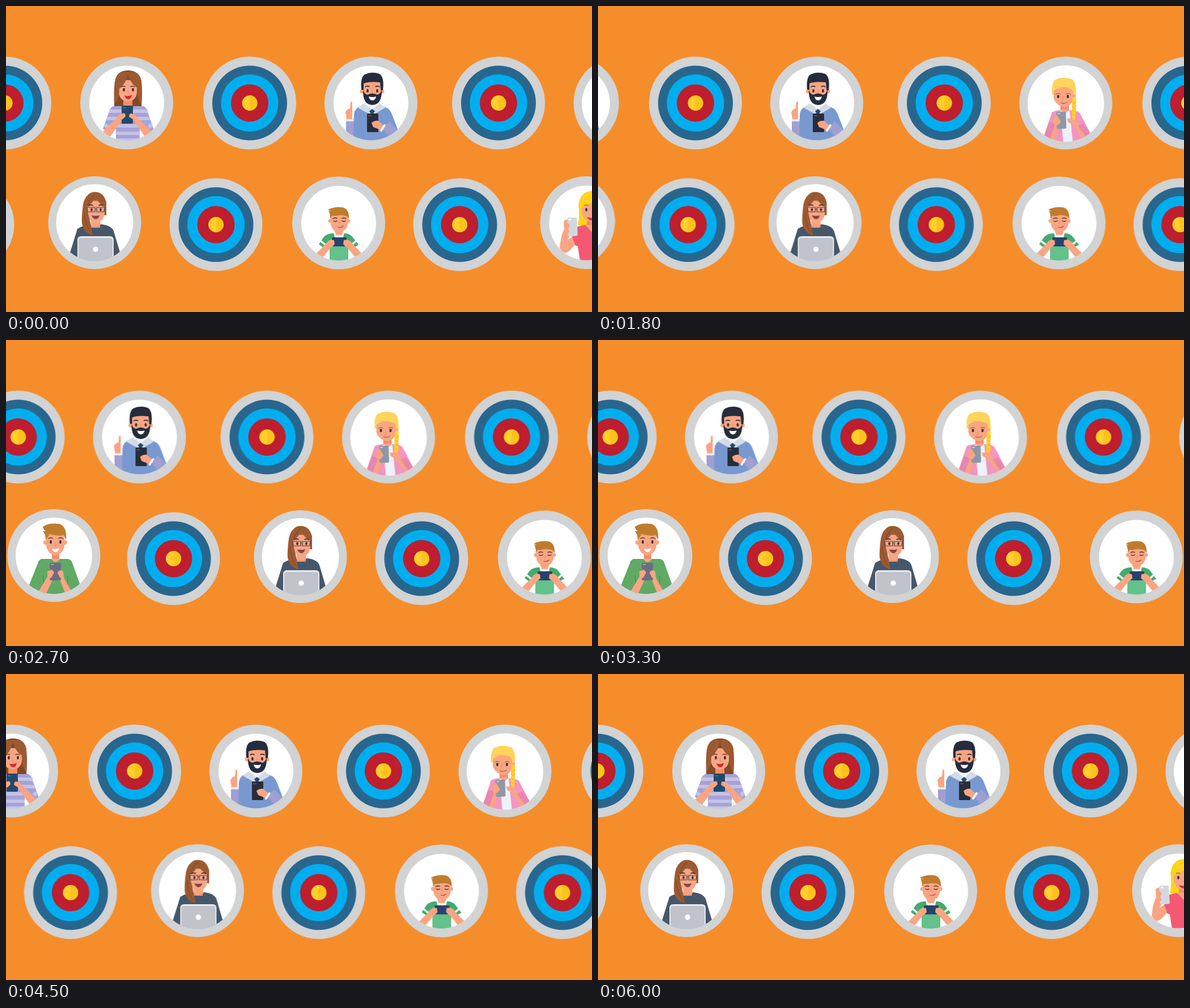
Animation of 1034x541 px, one loop 6300 ms. Source, as an HTML page:

```html
<!DOCTYPE html>
<html lang="en">
<head>
<meta charset="utf-8">
<title>Targets and people</title>
<style>
  html, body { margin: 0; width: 100%; height: 100%; overflow: hidden; background: #f68d2b; }
  svg { display: block; width: 100%; height: 100%; }
</style>
</head>
<body>
<svg id="stage" viewBox="0 0 1034 541"></svg>
<script>
const SKIN = '#f9a583', SHADE = '#ef8f6f', INK = '#2a2c3a', BROWN = '#9c5a32', DARK_BROWN = '#854826';

const path = (fill, d) => `<path fill="${fill}" d="${d}"/>`;
const line = (color, w, d) =>
  `<path fill="none" stroke="${color}" stroke-width="${w}" stroke-linecap="round" stroke-linejoin="round" d="${d}"/>`;
const circle = (fill, x, y, r) => `<circle fill="${fill}" cx="${x}" cy="${y}" r="${r}"/>`;
const oval = (fill, x, y, rx, ry) => `<ellipse fill="${fill}" cx="${x}" cy="${y}" rx="${rx}" ry="${ry}"/>`;
const box = (fill, x, y, w, h, r = 0) =>
  `<rect fill="${fill}" x="${x}" y="${y}" width="${w}" height="${h}" rx="${r}"/>`;
const eyes = (x1, x2, y) => oval(INK, x1, y, 1.8, 3) + oval(INK, x2, y, 1.8, 3);
const brows = (color, x1, x2, y) =>
  line(color, 1.6, `M${x1 - 4} ${y + 1}q3 -2.5 7 -.5M${x2 - 3} ${y + .5}q4 -2 7 .5`);

const target = (x, y) =>
  circle('#d1d3d4', x, y, 82) + circle('#29668d', x, y, 66) + circle('#00aeef', x, y, 50.5) +
  circle('#be1e2d', x, y, 33) + circle('#ffcf2b', x, y, 13.5) +
  path('#fdc31c', `M${x} ${y - 13.5}a13.5 13.5 0 0 1 0 27z`);

let clips = 0;
function badge(x, y, innerY, innerR, art, shift = 0) {
  const id = 'clip' + clips++;
  return `<g transform="translate(${shift})"><clipPath id="${id}">${circle('#fff', x, innerY, innerR)}</clipPath>` +
    circle('#d1d3d4', x, y, 82) + circle('#fff', x, innerY, innerR) +
    `<g clip-path="url(#${id})">${art}</g></g>`;
}

const stripedWoman =
  path(DARK_BROWN, 'M191 179Q190 150 192 134Q195 114 215 114Q236 114 239 134Q241 152 239 179z') +
  box(SHADE, 207, 160, 16, 22) +
  path('#a5a3d6', 'M190 177H242Q247 178 249 185L261 219L248 226L236 205V240H194V206L182 224L171 217L183 184Q185 178 190 177z') +
  [183, 196, 209, 222, 234].map((y, i) =>
    i < 2 ? box('#c4c2e8', 182 - i * 4, y, 68 + i * 8, 6) : box('#c4c2e8', 195, y, 41, 6)).join('') +
  path('#c4c2e8', 'M175 207L182 211L179 217L172 213zM256 207L250 211L253 217L259 213z') +
  path(SKIN, 'M206 177Q214 186 224 177z') +
  path(SKIN, 'M199 135Q214 127 231 135V153Q230 167 215 169Q200 167 199 153z') +
  path(BROWN, 'M215 117Q199 113 193 130L191 173Q200 165 200 146Q211 139 215 120Q221 139 231 144Q231 166 239 174L239 132Q234 113 215 117z') +
  brows(DARK_BROWN, 207, 223, 142) + eyes(208, 224, 148) +
  path('#d7282f', 'M209 158Q215 161 222 157Q221 165 215 165Q211 164 209 158z') +
  line(SHADE, 1.3, 'M215 150l1 5') +
  path(SKIN, 'M171 222L199 194Q204 187 211 189L213 196L205 202L183 232zM257 222L231 196Q225 187 218 189L217 197L225 202L245 231z') +
  box('#24486b', 204, 176, 20, 32, 2) + box('#3d6c91', 206, 179, 6, 2) +
  path(SKIN, 'M200 194Q205 188 210 190L211 195L205 201zM228 195Q222 188 218 191L217 196L225 201z');

const beardedMan =
  box('#a09fd1', 600, 202, 14, 40) + box('#e7eaf3', 600, 199, 14, 5) +
  path(SKIN, 'M601 200L599 188Q601 182 607 181L608 170Q610 167 611 171V200z') +
  path('#7899cf', 'M613 240L614 192Q615 180 626 177L645 190L664 177Q676 180 680 189L692 220L674 240z') +
  path('#d4dbe8', 'M631 172L646 182L660 172L669 180L650 191L646 186L641 191L621 180z') +
  path('#f4f5f8', 'M634 172H658L646 184z') +
  path('#214b68', 'M646 182l5 4l-3 4l4 19h-11l3 -19l-3 -4z') +
  circle(SKIN, 628, 151, 3.5) + circle(SKIN, 664, 151, 3.5) +
  path('#242c3e', 'M627 148Q625 126 633 121Q645 115 659 120Q668 126 665 149z') +
  path(SKIN, 'M631 137Q640 133 660 135L662 156Q656 171 646 171Q634 169 631 154z') +
  path('#242c3e', 'M630 148Q632 156 638 157Q646 152 655 157Q661 156 663 147Q664 175 646 175Q629 174 630 148z') +
  path('#fff', 'M640 160Q646 162 653 160Q652 167 646 167Q641 166 640 160z') +
  brows(INK, 638, 655, 142) + eyes(638, 655, 150) + line(SHADE, 1.3, 'M646 149v5') +
  path('#a09fd1', 'M665 217L676 204L692 220L677 232z') +
  box(INK, 637, 190, 20, 33, 1.5) + box('#4d5261', 639, 193, 6, 2) +
  path(SKIN, 'M645 207Q650 202 657 203L668 213L663 220L653 216L648 214z') +
  line('#f4f5f8', 4, 'M668 211l-6 9');

const braidGirl =
  box(SHADE, 816, 168, 15, 23) +
  path('#f395bf', 'M801 188Q805 185 816 184L831 184Q847 185 850 189L872 231L855 242H800L785 235z') +
  path('#eef1f8', 'M816 184L824 190L832 184L838 242H821z') +
  path(SKIN, 'M816 183L824 190L831 183z') +
  path('#ffd45c', 'M801 156Q800 136 806 131Q820 123 837 130Q845 137 843 160L837 163z') +
  circle(SKIN, 839, 160, 4) +
  path(SKIN, 'M804 150Q819 138 838 148V164Q836 177 824 179Q808 176 804 163z') +
  path('#ffd45c', 'M801 154Q803 138 817 134Q831 139 841 155L842 138L823 128Q804 129 802 141z') +
  line('#f3bd36', 1, 'M808 143Q823 142 837 153') +
  brows('#b77e30', 812, 829, 155) + eyes(812, 829, 160) +
  line('#c96357', 1.5, 'M817 171Q822 174 828 170') + line(SHADE, 1.3, 'M820 162v5') +
  line('#ffd02e', 7, 'M840 164L839 195') + path('#ffd02e', 'M836 194h7l-3 12z') +
  line('#edb62c', 1, [170, 177, 184, 191].map(y => `M837 ${y}l3 3l4 -4`).join('')) +
  path(SKIN, 'M793 239L804 207Q801 197 810 193L815 207L806 238zM869 231L846 207Q836 197 828 200L829 205L838 210L856 236z') +
  path('#e885b0', 'M784 237L797 205L807 208L796 239zM873 231L856 207L847 212L864 236z') +
  `<g transform="rotate(-2 817 202)">${box('#8c98a6', 809, 187, 17, 30, 2)}${box('#c4ccd3', 811, 189, 5, 2)}</g>` +
  path(SKIN, 'M803 204Q804 193 810 193L817 204L812 210L806 212zM827 199L838 199L846 207L839 210z');

const laptopWoman =
  path('#465769', 'M126 394Q135 388 150 386H169Q186 388 190 398L206 452H108z') +
  box(SHADE, 150, 376, 16, 16) + path(SKIN, 'M149 387Q158 395 167 387L166 380H150z') +
  path(BROWN, 'M135 369Q136 333 153 329Q174 327 177 350L177 370H135z') +
  path(SKIN, 'M143 349Q157 339 174 350V366Q172 382 159 383Q146 382 143 367z') +
  path(BROWN, 'M157 332Q140 330 136 351Q133 374 134 385Q138 402 153 405Q150 393 148 379Q144 365 143 355Q153 350 157 337Q163 349 174 355L177 367V347Q172 330 157 332z') +
  line(DARK_BROWN, 1.2, 'M138 365Q140 387 149 400M157 333Q148 340 144 353') +
  brows(INK, 150, 167, 352) + oval(INK, 151, 360, 1.8, 2.8) + oval(INK, 167, 360, 1.8, 2.8) +
  line('#3d4250', 1.2, 'M143 356H157V364H144zM160 356H174L173 364H160zM157 359H160') +
  path('#83454d', 'M151 370Q158 372 165 370Q163 377 158 377Q153 376 151 370z') +
  path('#e7e9ed', 'M126 452V414Q126 407 133 407H183Q190 407 190 414V452z') +
  path('#c0c3ca', 'M128 452V415Q128 410 133 410H183Q188 410 188 415V452z') +
  circle('#fff', 158, 430, 4.7);

const gamerBoy =
  box(SHADE, 580, 392, 15, 16) +
  path('#45aa70', 'M575 402H600Q609 404 612 409L622 422L609 430L603 420H571L564 430L552 421L561 408Q566 403 575 402z') +
  path('#63c18a', 'M571 414H604V452H571z') +
  path('#fff', 'M578 400H597L595 409H580z') + path(SKIN, 'M580 398H595L593 405H582z') +
  line('#fff', 3.5, 'M556 416L567 425M617 416L607 425') +
  circle(SKIN, 572, 380, 3.5) + circle(SKIN, 604, 380, 3.5) +
  path(SKIN, 'M573 369H603V387Q600 399 588 400Q576 399 573 387z') +
  path('#c17b2c', 'M572 376Q572 367 569 361L574 363Q570 360 568 360Q580 354 594 356Q606 359 605 377L602 372Q593 368 581 371L575 371z') +
  brows('#713f25', 581, 596, 375) + line(INK, 1.4, 'M578 380q3 2 6 0M593 380q3 2 6 0') +
  line('#a84e42', 1.3, 'M586 391Q591 393 595 389') + line(SHADE, 1.2, 'M588 380v5') +
  path(SKIN, 'M545 440L563 422Q568 414 576 412L580 421L574 426L555 449zM630 440L613 422Q608 414 599 412L595 421L601 426L620 449z') +
  box('#28436a', 575, 409, 26, 16, 2) +
  path(SKIN, 'M572 413L579 414L580 421L575 426L570 423zM603 413L596 414L595 421L600 426L605 423z');

const blondeWoman =
  path('#ffd21c', 'M1009 388Q1013 367 1010 353Q1013 328 1033 327Q1055 328 1056 352Q1055 375 1060 388z') +
  box(SHADE, 1025, 374, 16, 20) +
  path('#f45873', 'M1005 392Q1011 388 1024 387L1033 398L1042 387Q1057 388 1061 394L1068 422L1053 427V452H1013L1009 425L995 419z') +
  path(SKIN, 'M1022 387L1033 399L1043 387z') +
  path(SKIN, 'M1016 349Q1032 340 1050 350V366Q1048 380 1033 382Q1019 379 1016 366z') +
  path('#ffd21c', 'M1011 358Q1012 331 1033 331Q1054 333 1055 358Q1046 351 1040 341Q1029 353 1016 356L1015 376z') +
  brows('#b67725', 1024, 1042, 352) + eyes(1024, 1042, 360) +
  path('#d9313f', 'M1025 373Q1033 376 1040 373Q1037 380 1032 379Q1027 378 1025 373z') +
  path(SKIN, 'M977 428Q979 404 985 395L984 381Q988 375 994 380L998 402L991 413L999 408L1004 421Q990 441 982 435z') +
  `<g transform="rotate(-3 999 390)">${box('#d3d8df', 991, 374, 17, 33, 2)}${box('#f0f2f5', 993, 376, 5, 3)}</g>` +
  path(SKIN, 'M984 387L992 384L995 389L992 394L995 400L988 404z');

const smilingBoy =
  box(SHADE, 81, 374, 13, 18) +
  path('#60aa65', 'M63 387H80Q87 397 95 387H109Q116 388 118 397L133 439L113 452H56L39 438L56 395Q58 388 63 387z') +
  path(SKIN, 'M80 387Q88 398 95 387z') +
  line('#4c9554', 1.4, 'M66 417V450M109 417V450') +
  circle(SKIN, 70, 358, 4) + circle(SKIN, 104, 358, 4) +
  path(SKIN, 'M71 341H103V364Q100 379 87 381Q74 379 71 364z') +
  path('#c17b2c', 'M70 354Q70 343 65 338L70 338Q65 334 65 330Q76 323 93 325Q108 328 106 354L102 345Q89 347 77 343z') +
  brows('#713f25', 79, 96, 350) + eyes(79, 96, 357) + line(SHADE, 1.3, 'M87 359v6') +
  path('#fff', 'M81 369Q88 371 94 368Q93 375 87 375Q82 374 81 369z') +
  path(SKIN, 'M56 447L74 417Q73 406 83 405L87 414L70 450zM117 447L101 418Q102 407 93 405L91 414L105 449z') +
  box('#6c6d80', 77, 394, 20, 31, 2) + box('#9698a7', 79, 396, 6, 2) +
  path(SKIN, 'M73 409L81 406L85 411L80 420L73 423zM101 409L95 407L91 411L95 420L102 423z');

const topRow = [-2, 430, 869, 1300.5].map(x => target(x, 171.5)).join('') +
  badge(213, 171.5, 171.5, 66, stripedWoman) +
  badge(644, 171.5, 171.5, 66, beardedMan) +
  badge(825.5, 171.5, 172.5, 67.5, braidGirl, 258) +
  badge(1516, 171.5, 171.5, 66, '');

const bottomRow = [-67.5, 370.5, 800.5].map(x => target(x, 386.5)).join('') +
  badge(84.5, 381, 381.5, 67.5, smilingBoy, -363) +
  badge(156.5, 383, 383, 68, laptopWoman) +
  badge(587, 383.5, 384, 66, gamerBoy) +
  badge(1024.5, 383, 383.5, 66, blondeWoman);

document.getElementById('stage').innerHTML =
  `<rect width="1034" height="541" fill="#f68d2b"/><g id="top">${topRow}</g><g id="bottom">${bottomRow}</g>`;

// Offsets at every third step; rows run out for ten steps and return the same way.
const STEPS = 21, STEP_MS = 300;
function slide(id, stops) {
  const offset = step => {
    const k = Math.min(step, 20 - step), i = Math.min(Math.floor(k / 3), 2);
    return stops[i] + (stops[i + 1] - stops[i]) * (k / 3 - i);
  };
  const frames = Array.from({ length: STEPS + 1 }, (_, i) => ({
    offset: i / STEPS,
    transform: `translateX(${offset(Math.min(i, STEPS - 1))}px)`,
    easing: 'step-end'
  }));
  document.getElementById(id).animate(frames, { duration: STEPS * STEP_MS, iterations: Infinity });
}
slide('top', [0, -93.3, -258, -408.5]);
slide('bottom', [0, 91.3, 226.5, 363]);
</script>
</body>
</html>
```
